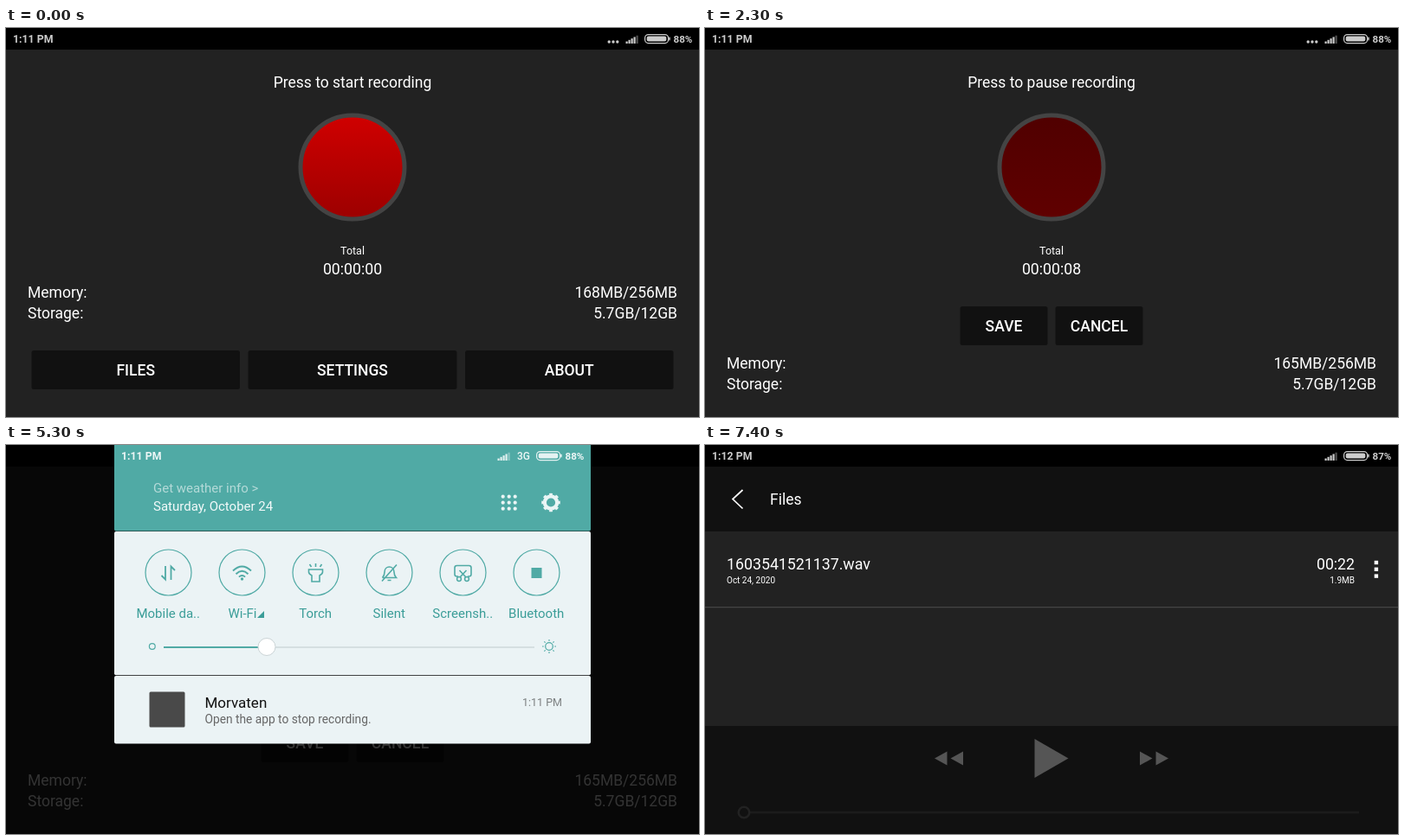
An HTML page for the animation above (8000 ms loop, 800 by 450 pixels).

```html
<!DOCTYPE html>
<html lang="en">
<head>
<meta charset="utf-8">
<title>Audio recorder walkthrough</title>
<style>
  html, body { margin: 0; width: 100%; height: 100%; overflow: hidden; background: #222; }
  svg { display: block; width: 800px; height: 450px; font-family: Roboto, sans-serif; }
  text { white-space: pre; }
</style>
</head>
<body>
<svg id="stage" viewBox="0 0 800 450"></svg>
<script>
const TEAL = '#50aaa5', PANEL = '#ebf3f5';

const rect = (x, y, w, h, fill, rx = 0) =>
  `<rect x="${x}" y="${y}" width="${w}" height="${h}" rx="${rx}" fill="${fill}"/>`;
const circle = (x, y, r, fill, stroke = 'none', width = 1, extra = '') =>
  `<circle cx="${x}" cy="${y}" r="${r}" fill="${fill}" stroke="${stroke}" stroke-width="${width}" ${extra}/>`;
const line = (d, stroke, width, extra = '') =>
  `<path d="${d}" fill="none" stroke="${stroke}" stroke-width="${width}" ${extra}/>`;
const shape = (d, fill) => `<path d="${d}" fill="${fill}"/>`;
const text = (x, y, str, { size = 17.5, fill = '#fff', anchor = 'start', weight = 400 } = {}) =>
  `<text x="${x}" y="${y}" font-size="${size}" fill="${fill}" text-anchor="${anchor}" font-weight="${weight}">${str}</text>`;
const range = (n, fn) => Array.from({ length: n }, (_, i) => fn(i)).join('');

// Status bar pieces
const signal = (x, fill) => range(5, i =>
  `<g opacity="${i < 4 ? 1 : .4}">${rect(x + i * 3, 15.5 - i * 1.7, 2.2, 2.5 + i * 1.7, fill)}</g>`);
const battery = (x, fill) =>
  `<rect x="${x + .6}" y="7.6" width="27" height="10" rx="4" fill="none" stroke="${fill}" stroke-width="1.2"/>` +
  rect(x + 2.7, 9.6, 22.6, 6, fill, 2) + rect(x + 28.2, 10.5, 1.5, 4, fill, .7);
const statusBar = (clock, charge, dots) => {
  const fill = '#ccc', bold = { size: 12.3, fill, weight: 700 };
  return rect(0, 0, 800, 25, '#000') + text(8, 17, clock, bold) +
    (dots ? range(3, i => circle(696.2 + i * 4.8, 16, 1.7, fill)) : '') +
    signal(715.5, fill) + battery(737, fill) +
    text(770.5, 17, charge, { ...bold, size: 11.6 });
};

// Recorder screen
const button = (x, y, w, label) => rect(x, y, w, 45, '#111', 2.5) +
  text(x + w / 2, y + 29, label, { anchor: 'middle', weight: 500 });
const info = (y, label, value) =>
  text(25, y, label) + text(775, y, value, { anchor: 'end' });
const recorder = ({ prompt, time, top, bottom, memory, infoY, buttons }) => `
  <linearGradient id="glow" x2="0" y2="1">
    <stop stop-color="${top}"/><stop offset="1" stop-color="${bottom}"/>
  </linearGradient>` +
  rect(0, 0, 800, 450, '#222') +
  text(400, 69, prompt, { anchor: 'middle' }) +
  circle(400, 161, 60, 'url(#glow)', '#444', 5) +
  text(400, 262, 'Total', { size: 12.5, anchor: 'middle' }) +
  text(400, 285, time, { size: 17.7, anchor: 'middle' }) +
  info(infoY, 'Memory:', memory) + info(infoY + 24, 'Storage:', '5.7GB/12GB') + buttons;

const idle = recorder({
  prompt: 'Press to start recording', time: '00:00:00', top: '#d00000', bottom: '#9c0000',
  memory: '168MB/256MB', infoY: 311.5,
  buttons: button(29.5, 373, 240.5, 'FILES') + button(279.5, 373, 241, 'SETTINGS') + button(530, 373, 240.5, 'ABOUT')
});
const recording = recorder({
  prompt: 'Press to pause recording', time: '00:00:08', top: '#500000', bottom: '#600000',
  memory: '165MB/256MB', infoY: 393.5,
  buttons: button(294.5, 322, 101, 'SAVE') + button(404.5, 322, 101, 'CANCEL')
});

// Notification shade: icons are drawn around their own centre
const icons = {
  'Mobile da..': line('M-3.5-8V7.5L-8 3M3 8V-7.5L7.5-3', TEAL, 1.8),
  'Wi-Fi': line('M-10.5-2.5Q0-12.5 10.5-2.5M-7 1.2Q0-5.5 7 1.2M-3.6 4.6Q0 1.4 3.6 4.6', TEAL, 1.9) + circle(0, 7, 1.7, TEAL),
  'Torch': line('M-8-4H8V-1Q8 1 4.5 3V10H-4.5V3Q-8 1-8-1ZM0-7V-11M-5-7L-7-10M5-7L7-10', TEAL, 1.6),
  'Silent': line('M-8 5.5H8Q5.5 3 5.5-1C5.5-9-5.5-9-5.5-1Q-5.5 3-8 5.5M-2 8.5H2M8.5-9.5L-8.5 9.5', TEAL, 1.6),
  'Screensh..': line('M-5.5 4H-7Q-9.5 4-9.5 1.5V-6Q-9.5-8.5-7-8.5H7Q9.5-8.5 9.5-6V1.5Q9.5 4 7 4H5.5M-4-3L3.5 5M4-3L-3.5 5', TEAL, 1.6) +
    circle(-4.5, 7, 2.4, 'none', TEAL, 1.5) + circle(4.5, 7, 2.4, 'none', TEAL, 1.5),
  'Bluetooth': rect(-6, -6, 12, 12, TEAL)
};
const toggles = Object.entries(icons).map(([label, icon], i) => {
  const x = 187.5 + i * 85;
  return circle(x, 147.5, 26.5, 'none', TEAL, 1.2) +
    `<g transform="translate(${x} 148)">${icon}</g>` +
    text(label === 'Wi-Fi' ? x + .5 : x - .3, 199.5, label, { size: 15, fill: '#3b9d98', anchor: 'middle' });
}).join('');

const shade =
  recording + rect(0, 0, 800, 450, 'rgba(0,0,0,.8)') + rect(0, 0, 800, 25, '#000') +
  rect(125, -5, 550, 104.5, TEAL, 2) + rect(125, 100, 550, 166.3, PANEL, 2) + rect(125, 267, 550, 78.5, PANEL, 2) +
  text(133, 17, '1:11 PM', { size: 12.3, fill: '#edf6f6', weight: 700 }) +
  signal(567.5, '#e0f0ef') + text(590, 17, '3G', { size: 12, fill: '#edf6f6', weight: 500 }) +
  battery(612, '#e5f2f2') + text(645.5, 17, '88%', { size: 11.6, fill: '#edf6f6', weight: 700 }) +
  text(170, 55, 'Get weather info &gt;', { size: 15, fill: '#b4dad8' }) +
  text(170, 75.5, 'Saturday, October 24', { size: 15, fill: '#f3fafa' }) +
  range(9, i => circle(573.7 + i % 3 * 7, 59.7 + Math.floor(i / 3) * 7, 2.1, '#eaf5f5')) +
  circle(629, 66.5, 7.2, 'none', '#eaf5f5', 4.2) +
  circle(629, 66.5, 9.6, 'none', '#eaf5f5', 2.4, 'pathLength="16" stroke-dasharray="1" stroke-dashoffset=".5"') +
  toggles + shape('M290 200H298V192Z', '#3b9d98') +
  circle(168.8, 233, 3.4, 'none', TEAL, 1.2) +
  line('M300 234H610', '#d5dfe1', 2) + line('M182 234H300', TEAL, 2) +
  circle(301, 233.5, 10, '#fff', '#cbd4d6', 1) +
  circle(627, 233, 4.3, 'none', TEAL, 1.2) +
  range(8, i => line('M0-6.2V-8', TEAL, 1.2, `transform="translate(627 233) rotate(${i * 45})"`)) +
  rect(165.5, 285.5, 41, 41, '#494949', 1.5) +
  text(229.5, 304, 'Morvaten', { size: 17, fill: '#111' }) +
  text(229.5, 321.5, 'Open the app to stop recording.', { size: 13.75, fill: '#666' }) +
  text(642, 302, '1:11 PM', { size: 12.5, fill: '#7b7f80', anchor: 'end' });

// File list with player
const files =
  rect(0, 0, 800, 450, '#111') + rect(0, 100, 800, 225, '#222') +
  line('M43.5 52L32 62.5L43.5 73.5', '#fff', 1.7) + text(75, 69, 'Files') +
  text(25, 143.5, '1603541521137.wav', { size: 17.75 }) + text(25, 159.5, 'Oct 24, 2020', { size: 10 }) +
  text(750, 143.5, '00:22', { size: 17.7, anchor: 'end' }) + text(750, 159.5, '1.9MB', { size: 10, anchor: 'end' }) +
  range(3, i => rect(772.7, 133.8 + i * 7.8, 4.4, 4.4, '#fff')) +
  rect(0, 187, 800, 1.3, '#444') +
  shape('M380.5 340L419.5 362.5L380.5 385Z', '#555') +
  shape('M279.5 354.5V370.5L265 362.5ZM298 354.5V370.5L283.5 362.5Z', '#555') +
  shape('M502 354.5V370.5L516.5 362.5ZM520.5 354.5V370.5L535 362.5Z', '#555') +
  line('M52 425H755', '#1c1c1c', 2.5) + circle(45, 425, 6.3, 'none', '#222', 2.5);

const scenes = [
  { start: 0, markup: idle + statusBar('1:11 PM', '88%', true) },
  { start: 500, markup: recording + statusBar('1:11 PM', '88%', true) },
  { start: 3500, markup: shade },
  { start: 6500, markup: files + statusBar('1:12 PM', '87%', false) }
];
const stage = document.getElementById('stage');
const origin = performance.now();
let shown;

function render() {
  const time = (performance.now() - origin) % 8000;
  const scene = scenes.findLast(s => time >= s.start);
  if (scene !== shown) {
    stage.innerHTML = scene.markup;
    shown = scene;
  }
  requestAnimationFrame(render);
}
render();
</script>
</body>
</html>
```
